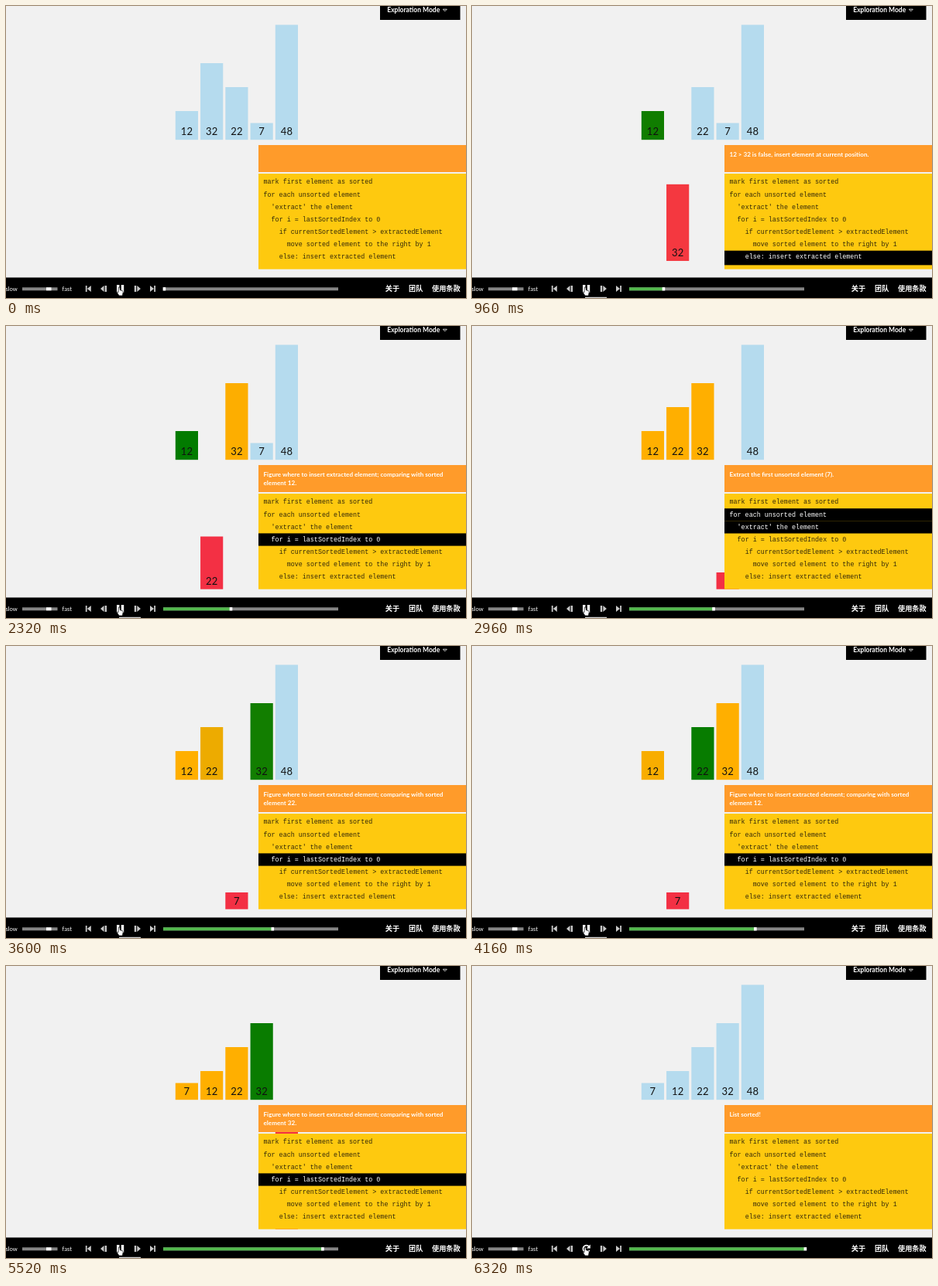
Write an HTML page that moves like this. It is 594 px wide and 378 px high and loops after 6400 ms.

```html
<!DOCTYPE html>
<html lang="en">
<head>
<meta charset="utf-8">
<title>Insertion sort</title>
<style>
  html, body { margin: 0; width: 100%; height: 100%; overflow: hidden; background: #f1f1f1; }
  svg { display: block; width: 594px; height: 378px; }
  text { font-family: Lato, sans-serif; }
  .num { font-size: 13px; text-anchor: middle; fill: #111; }
  .msg { font-size: 8.1px; font-weight: 700; fill: #fff; }
  .code { font: 8.4px "Liberation Mono", monospace; }
  .label { font-size: 7.6px; fill: #fff; }
  .menu { font-size: 8.5px; font-weight: 700; fill: #fff; }
  .link { font: 700 9.2px "Noto Sans CJK SC", "Noto Sans CJK", sans-serif; fill: #fff; }
</style>
</head>
<body>
<svg viewBox="0 0 594 378">
  <rect width="594" height="378" fill="#f1f1f1"/>
  <g id="bars"></g>

  <rect x="326" y="180" width="268" height="35" fill="#ff9b2a"/>
  <text class="msg" id="msg1" x="332.5" y="194.6"/>
  <text class="msg" id="msg2" x="332.5" y="206.3"/>
  <rect x="326" y="217" width="268" height="123.7" fill="#fec90f"/>
  <g id="code"></g>

  <rect x="483" width="103.5" height="18" fill="#000"/>
  <text class="menu" x="492.3" y="8.4">Exploration Mode</text>
  <path d="M564.3 4.2h5l-2.5 2.6z" fill="none" stroke="#ddd" stroke-width=".9"/>

  <rect y="351.5" width="594" height="26.5" fill="#000"/>
  <text class="label" x="-.5" y="368.5">slow</text>
  <rect x="21" y="364.3" width="45.5" height="4" fill="#858585"/>
  <rect x="52" y="364.3" width="6.5" height="4" fill="#fff"/>
  <text class="label" x="72.5" y="368.5">fast</text>
  <g fill="#c9c9c9">
    <path d="M102.8 362h1.8v8h-1.8zM109.8 362v8l-5-4z"/>
    <path d="M126.5 362v8l-4.5-4zM127.6 362h2.4v8h-2.4z"/>
    <path d="M165.8 362h2.4v8h-2.4zM169.3 362v8l4.6-4z"/>
    <path d="M186 362v8l5-4zM191.2 362h1.8v8h-1.8z"/>
  </g>
  <path id="pause" d="M143 361h3.4v10h-3.4zM148.8 361h3.4v10h-3.4z" fill="#fff"/>
  <g id="replay">
    <path d="M151 363.2a4.3 4.3 0 1 0 .6 4.6" fill="none" stroke="#fff" stroke-width="1.8"/>
    <path d="M152.8 360.6v5h-5z" fill="#fff"/>
  </g>
  <path d="M145.2 364.4q1-1 1.8 0l.4 3.4 2.8.8q1.2.4 1 2l-.8 4.4h-4.4l-2.6-4q0-1.4 1.6-.4z"
        fill="#fff" stroke="#000" stroke-width=".7"/>
  <rect id="tip" x="146" y="376.8" width="28" height="1.2" fill="#d5d5d5"/>
  <rect x="203" y="364.3" width="226" height="4" fill="#858585"/>
  <rect id="done" x="203" y="364.3" height="4" fill="#52b74c"/>
  <rect id="knob" y="364.1" width="3.6" height="4.4" fill="#fff"/>
  <text class="link" x="489.8" y="369">关于</text>
  <text class="link" x="520" y="369">团队</text>
  <text class="link" x="550" y="369">使用条款</text>
</svg>
<script>
const LOOP = 6400, TWEEN = 290;
const VALUES = [12, 32, 22, 7, 48];
const BLUE = [181, 219, 238], ORANGE = [255, 175, 0], GREEN = [0, 122, 0], RED = [243, 48, 68];
const CODE = [
  [0, 'mark first element as sorted'],
  [0, 'for each unsorted element'],
  [2, "'extract' the element"],
  [2, 'for i = lastSortedIndex to 0'],
  [4, 'if currentSortedElement > extractedElement'],
  [6, 'move sorted element to the right by 1'],
  [4, 'else: insert extracted element']
];
// Start time of each step, in ms
const STARTS = [-290, 20, 310, 600, 888, 1185, 1480, 1775, 2070, 2370, 2672,
  2965, 3245, 3525, 3815, 4105, 4400, 4690, 4990, 5290, 5590, 5890];

const $ = id => document.getElementById(id);
const add = (parent, tag, attrs, text = '') => {
  const el = document.createElementNS('http://www.w3.org/2000/svg', tag);
  for (const k in attrs) el.setAttribute(k, attrs[k]);
  el.textContent = text;
  parent.appendChild(el);
  return el;
};

// Run the sort once and record every step
function record() {
  const bars = VALUES.map((v, i) => ({ v, slot: i, down: 0, color: BLUE }));
  const order = bars.slice(), steps = [];
  const snap = (msg, ...lines) => steps.push({ msg, lines, bars: bars.map(b => ({ ...b })) });
  const insert = (bar, other) => {
    bar.down = 0;
    bar.color = other.color = ORANGE;
  };

  snap('');
  bars[0].color = ORANGE;
  snap(`Mark the first element (${bars[0].v}) as sorted.`, 0);
  for (let i = 1; i < order.length; i++) {
    const x = order[i];
    x.down = 1;
    x.color = RED;
    snap(`Extract the first unsorted element (${x.v}).`, 1, 2);
    let j = i - 1;
    for (; j >= 0; j--) {
      const cur = order[j];
      if (j < i - 1) order[j + 2].color = ORANGE;
      cur.color = GREEN;
      snap(`Figure where to insert extracted element; comparing with sorted|element ${cur.v}.`, 3);
      if (cur.v <= x.v) {
        insert(x, cur);
        snap(`${cur.v} > ${x.v} is false, insert element at current position.`, 6);
        break;
      }
      order[j + 1] = cur;
      order[j] = x;
      cur.slot = j + 1;
      x.slot = j;
      snap(`${cur.v} > ${x.v} is true, hence move current sorted element (${cur.v}) to the right by|1.`, 4, 5);
    }
    if (j < 0) {
      insert(x, order[1]);
      snap('At beginning of array (nothing to compare), hence insert element at|current position.', 3);
    }
  }
  bars.forEach(b => b.color = BLUE);
  snap('List sorted!');
  return steps;
}

const steps = record(), last = steps.length - 1;

const bars = VALUES.map(v => {
  const g = add($('bars'), 'g', {}), h = 3.1 * v;
  const rect = add(g, 'rect', { y: 173.2 - h, width: 29.2, height: h });
  add(g, 'text', { class: 'num', x: 14.6, y: 167 }, v);
  return { g, rect };
});

const lines = CODE.map(([indent, text], i) => ({
  back: add($('code'), 'rect', { x: 326, y: 220.1 + 16.1 * i, width: 268, height: i < 6 ? 16.2 : 18.7 }),
  text: add($('code'), 'text', { class: 'code', x: 332.5 + 5.04 * indent, y: 230.4 + 16.1 * i }, text)
}));

const ease = u => u < .5 ? 4 * u ** 3 : 1 - 4 * (1 - u) ** 3;
const mix = (a, b, u) => a + (b - a) * u;

let shown = -1;
function showStep(k) {
  if (k === shown) return;
  shown = k;
  const { msg, lines: active } = steps[k];
  const [first, second = ''] = msg.split('|');
  $('msg1').textContent = first;
  $('msg2').textContent = second;
  lines.forEach((l, i) => {
    const on = active.includes(i);
    l.back.setAttribute('fill', on ? '#000' : 'none');
    l.text.setAttribute('fill', on ? '#fff' : '#33290a');
  });
  const w = 226 * k / last;
  $('done').setAttribute('width', w);
  $('knob').setAttribute('x', 202.6 + w);
  $('pause').style.display = k < last ? '' : 'none';
  $('replay').style.display = k < last ? 'none' : '';
  $('tip').style.display = k > 0 && k < last ? '' : 'none';
}

function draw(t) {
  let k = last;
  while (STARTS[k] > t) k--;
  showStep(k);
  const u = ease(Math.min(1, (t - STARTS[k]) / TWEEN));
  const from = steps[Math.max(0, k - 1)].bars, to = steps[k].bars;
  bars.forEach(({ g, rect }, i) => {
    const a = from[i], b = to[i];
    const x = 218.8 + 32.25 * mix(a.slot, b.slot, u), y = 167.5 * mix(a.down, b.down, u);
    g.setAttribute('transform', `translate(${x} ${y})`);
    rect.setAttribute('fill', `rgb(${a.color.map((c, n) => Math.round(mix(c, b.color[n], u)))})`);
  });
}

const t0 = performance.now();
function tick() {
  draw((performance.now() - t0) % LOOP);
  requestAnimationFrame(tick);
}
tick();
</script>
</body>
</html>
```
